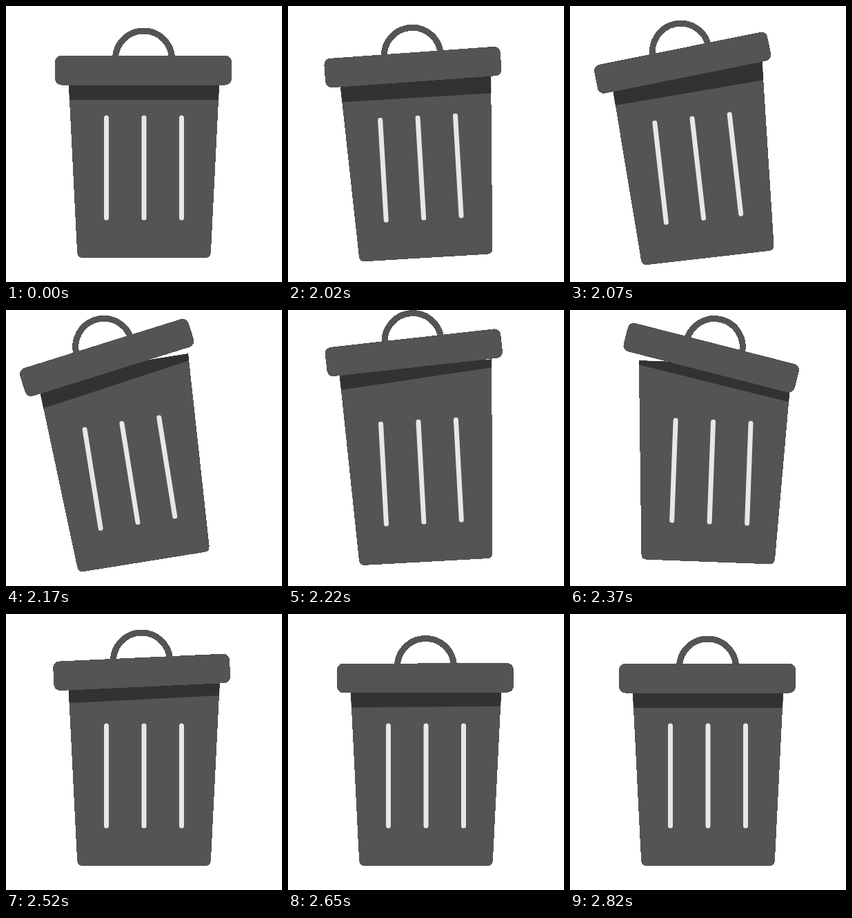
Write an HTML page that moves like this. It is 400 px wide and 400 px high and loops after 2.85 s.

```html
<!DOCTYPE html>
<html lang="en">
<head>
<meta charset="utf-8">
<title>Trash can</title>
<style>
  html, body { margin: 0; height: 100%; overflow: hidden; background: #fff; }
  svg { display: block; width: 100vw; height: 100vh; }
  .crisp { shape-rendering: crispEdges; }
</style>
</head>
<body>
<svg viewBox="0 0 400 400">
  <defs>
    <path id="shape" d="M89 77H311L296.9 357Q296.5 365 289 365H111Q103.5 365 103.1 357Z"/>
    <clipPath id="inside"><use href="#shape"/></clipPath>
  </defs>
  <g id="can" fill="#545454">
    <use class="crisp" href="#shape"/>
    <g clip-path="url(#inside)">
      <rect id="shadow" x="0" y="-64" width="400" height="200" fill="#323232"/>
    </g>
    <path d="M145.5 162V307M200 162V307M254.5 162V307" stroke="#ece4ec" stroke-width="7" stroke-linecap="round"/>
    <g id="lid" class="crisp">
      <path d="M158.5 77a41 41 0 0 1 82 0" fill="none" stroke="#545454" stroke-width="9"/>
      <rect x="71" y="72" width="256" height="42.5" rx="9"/>
    </g>
  </g>
</svg>
<script>
  const LOOP = 2850, REST = 2000, STEP = 25;
  const SHADOW_LAG = 18, SHADOW_GAIN = 1.16;
  const [can, lid, shadow] = ['can', 'lid', 'shadow'].map(id => document.getElementById(id));

  // Eases through [time, value] turning points; a negative first time opens mid-swing.
  function swing(...points) {
    return t => {
      const next = points.findIndex(p => p[0] >= t);
      if (t <= 0 || next < 0) return 0;
      const [t0, v0] = points[next - 1], [t1, v1] = points[next];
      const u = (t - t0) / (t1 - t0);
      return v0 + (v1 - v0) * u * u * (3 - 2 * u);
    };
  }

  const lean  = swing([-65, 0], [160, -9.6], [295, 4.1], [460, 0]);
  const slide = swing([-60, 0], [165, -5.6], [265, 2.8], [385, -5.4], [640, 0]);
  const lift  = swing([-45, 0], [225, -32], [685, 0]);
  const tilt  = swing([0, 0], [145, -9.2], [375, 12.2], [455, -3.4], [680, 0]);

  function draw(ms) {
    // The motion runs in steps of 40 per second.
    const t = Math.floor((ms % LOOP + 5) / STEP) * STEP - REST;
    const late = t - SHADOW_LAG;
    can.setAttribute('transform', `rotate(${lean(t)} 200 364)`);
    lid.setAttribute('transform', `translate(${slide(t)} ${lift(t)}) rotate(${tilt(t)} 199 93)`);
    shadow.setAttribute('transform', `translate(0 ${SHADOW_GAIN * lift(late)}) rotate(${tilt(late)} 200 136)`);
  }

  const start = performance.now();
  function tick() {
    draw(performance.now() - start);
    requestAnimationFrame(tick);
  }
  tick();
</script>
</body>
</html>
```
